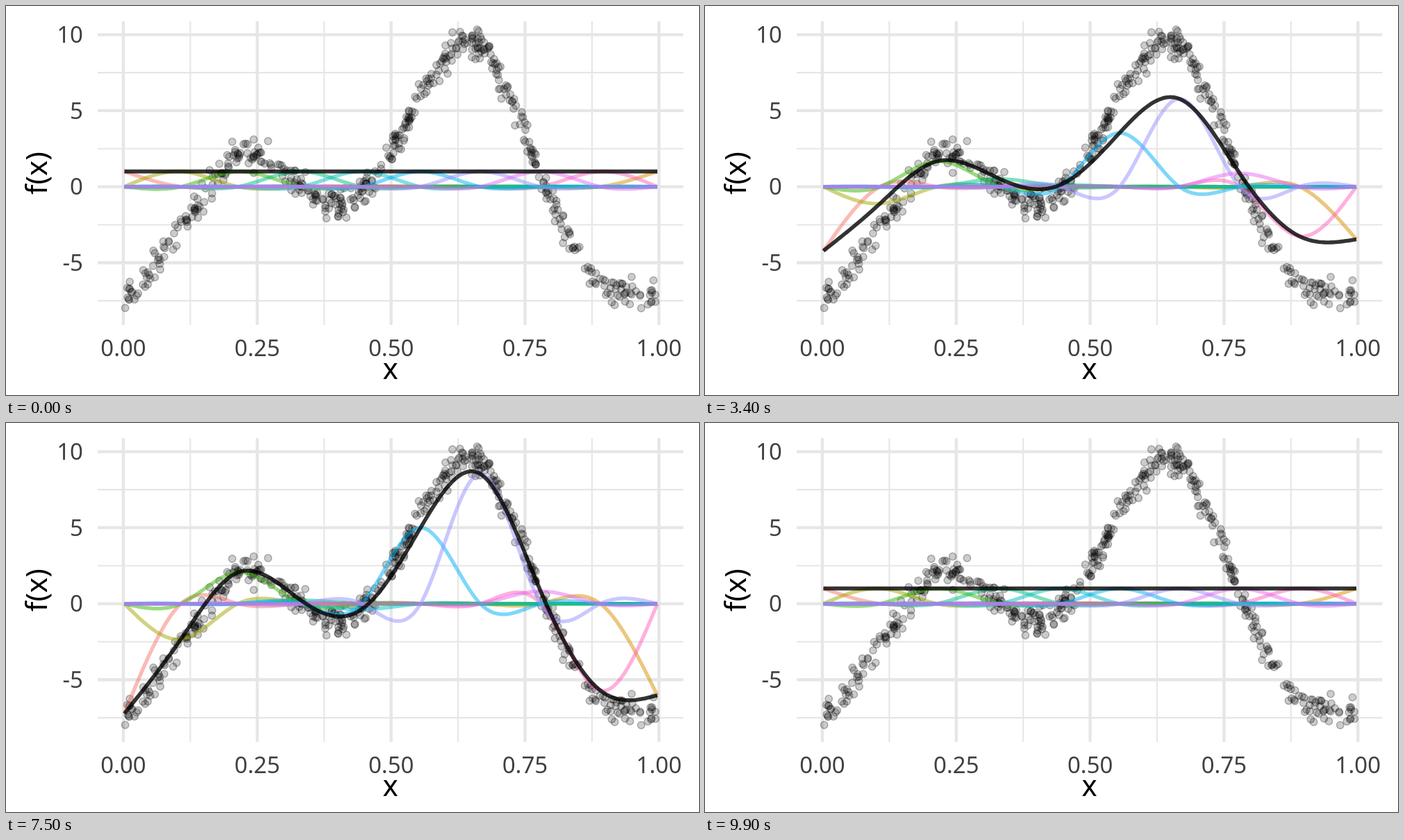
Recreate the animation shown at these times as an HTML page with a canvas. Size 998 by 561 pixels, loop 10000 ms.

```html
<!DOCTYPE html>
<html lang="en">
<head>
<meta charset="utf-8">
<title>Spline basis weights</title>
<style>
  html, body { margin: 0; width: 100%; height: 100%; overflow: hidden; background: #fff; }
  canvas { display: block; width: 998px; height: 561px; }
</style>
</head>
<body>
<canvas id="stage" width="998" height="561"></canvas>
<script>
const W = 998, H = 561, LOOP = 10000, STEP = 100;
const ctx = document.getElementById('stage').getContext('2d');
const px = x => 169 + x * 771.3;
const py = y => 260.6 - y * 21.93;

// Natural cubic spline through the given points
function spline(xs, ys) {
  const n = xs.length, m = Array(n).fill(0), c = Array(n).fill(0), d = Array(n).fill(0);
  for (let i = 1; i < n - 1; i++) {
    const a = xs[i] - xs[i - 1], b = xs[i + 1] - xs[i];
    const r = 6 * ((ys[i + 1] - ys[i]) / b - (ys[i] - ys[i - 1]) / a);
    const den = 2 * (a + b) - a * c[i - 1];
    c[i] = b / den;
    d[i] = (r - a * d[i - 1]) / den;
  }
  for (let i = n - 2; i > 0; i--) m[i] = d[i] - c[i] * m[i + 1];
  return x => {
    let i = 0;
    while (i < n - 2 && x > xs[i + 1]) i++;
    const h = xs[i + 1] - xs[i], u = (xs[i + 1] - x) / h, v = 1 - u;
    return u * ys[i] + v * ys[i + 1] +
      ((u ** 3 - u) * m[i] + (v ** 3 - v) * m[i + 1]) * h * h / 6;
  };
}

// One cardinal spline per knot, scaled by its weight
const knots = [170.5, 252, 334, 425, 512, 597, 683, 770, 856, 938];
const weights = [-7.95, -2.62, 2.15, 0.15, -0.5, 5.35, 9.2, 0.8, -6.3, -6.65];
const colors = ['#F8766D', '#A3A500', '#39B600', '#00BF7D', '#00BFC4',
  '#00B0F6', '#9590FF', '#E76BF3', '#FF62BC', '#D89000'];
const order = [0, 9, 8, 1, 2, 3, 4, 5, 6, 7];

const SAMPLES = 256;
const xs = Array.from({ length: SAMPLES + 1 },
  (_, i) => knots[0] + (knots[9] - knots[0]) * i / SAMPLES);
const basis = knots.map((_, k) => {
  const f = spline(knots, knots.map((_, j) => +(j === k)));
  return xs.map(f);
});

// Mean of the scattered observations
const trend = spline(knots, [-7.4, -2.8, 2.1, 0.1, -0.5, 6, 9.1, 0.8, -6.1, -7.1]);

let seed = 20190;
function rand() {
  seed = (seed + 0x6D2B79F5) | 0;
  let t = Math.imul(seed ^ (seed >>> 15), 1 | seed);
  t = (t + Math.imul(t ^ (t >>> 7), 61 | t)) ^ t;
  return ((t ^ (t >>> 14)) >>> 0) / 4294967296;
}
const noise = () => (rand() + rand() + rand() + rand() - 2) * 0.85;

function line(c, x1, y1, x2, y2, width) {
  c.lineWidth = width;
  c.beginPath();
  c.moveTo(x1, y1);
  c.lineTo(x2, y2);
  c.stroke();
}

function dot(c, x, y) {
  c.beginPath();
  c.arc(x, y, 5.2, 0, 2 * Math.PI);
  c.fill();
  c.stroke();
}

function text(c, s, x, y, size, align, color) {
  c.font = size + 'px "Noto Sans", "Open Sans", sans-serif';
  c.textAlign = align;
  c.fillStyle = color;
  c.fillText(s, x, y);
}

function drawBackdrop() {
  const cv = document.createElement('canvas');
  cv.width = W;
  cv.height = H;
  const c = cv.getContext('2d');
  c.fillStyle = '#fff';
  c.fillRect(0, 0, W, H);

  c.strokeStyle = '#e6e6e6';
  const hline = (y, w) => line(c, 132, py(y), 975.5, py(y), w);
  const vline = (x, w) => line(c, px(x), 22, px(x), 460, w);
  const yTicks = [-5, 0, 5, 10], xTicks = [0, 0.25, 0.5, 0.75, 1];
  yTicks.forEach(y => hline(y - 2.5, 2.1));
  xTicks.slice(1).forEach(x => vline(x - 0.125, 2.1));
  yTicks.forEach(y => hline(y, 4.3));
  xTicks.forEach(x => vline(x, 4.3));

  c.fillStyle = 'rgba(0,0,0,.2)';
  c.strokeStyle = 'rgba(0,0,0,.28)';
  c.lineWidth = 1.5;
  for (let i = 0; i < 500; i++) {
    const x = 170 + rand() * 768;
    dot(c, x, py(trend(x) + noise()));
  }

  yTicks.forEach(y => text(c, String(y), 111, py(y) + 11.7, 33, 'right', '#404040'));
  xTicks.forEach(x => text(c, x.toFixed(2), px(x), 505, 33, 'center', '#404040'));
  text(c, 'x', 553.5, 538, 42, 'center', '#000');
  c.translate(59, 241);
  c.rotate(-Math.PI / 2);
  text(c, 'f(x)', 0, 0, 42, 'center', '#000');
  return cv;
}

const ease = u => u < 0.5 ? 4 * u ** 3 : 1 - 4 * (1 - u) ** 3;
const clamp = u => Math.min(1, Math.max(0, u));

// 0 = all weights one, 1 = fitted weights
function progress(t) {
  const f = Math.floor(t / STEP);
  return ease(clamp((f - 16) / 34)) - ease(clamp((f - 66) / 33));
}

function curve(ys, color, alpha, width) {
  ctx.globalAlpha = alpha;
  ctx.strokeStyle = color;
  ctx.lineWidth = width;
  ctx.beginPath();
  xs.forEach((x, i) => ctx.lineTo(x, py(ys[i])));
  ctx.stroke();
  ctx.globalAlpha = 1;
}

const backdrop = drawBackdrop();
ctx.lineJoin = 'round';

function draw(t) {
  const p = progress(t);
  const w = weights.map(v => 1 + (v - 1) * p);
  ctx.drawImage(backdrop, 0, 0);
  for (const k of order) curve(basis[k].map(b => b * w[k]), colors[k], 0.5, 5.3);
  curve(xs.map((_, i) => w.reduce((s, v, k) => s + v * basis[k][i], 0)), '#000', 0.8, 5.6);
}

function tick() {
  draw(performance.now() % LOOP);
  requestAnimationFrame(tick);
}
tick();
</script>
</body>
</html>
```
